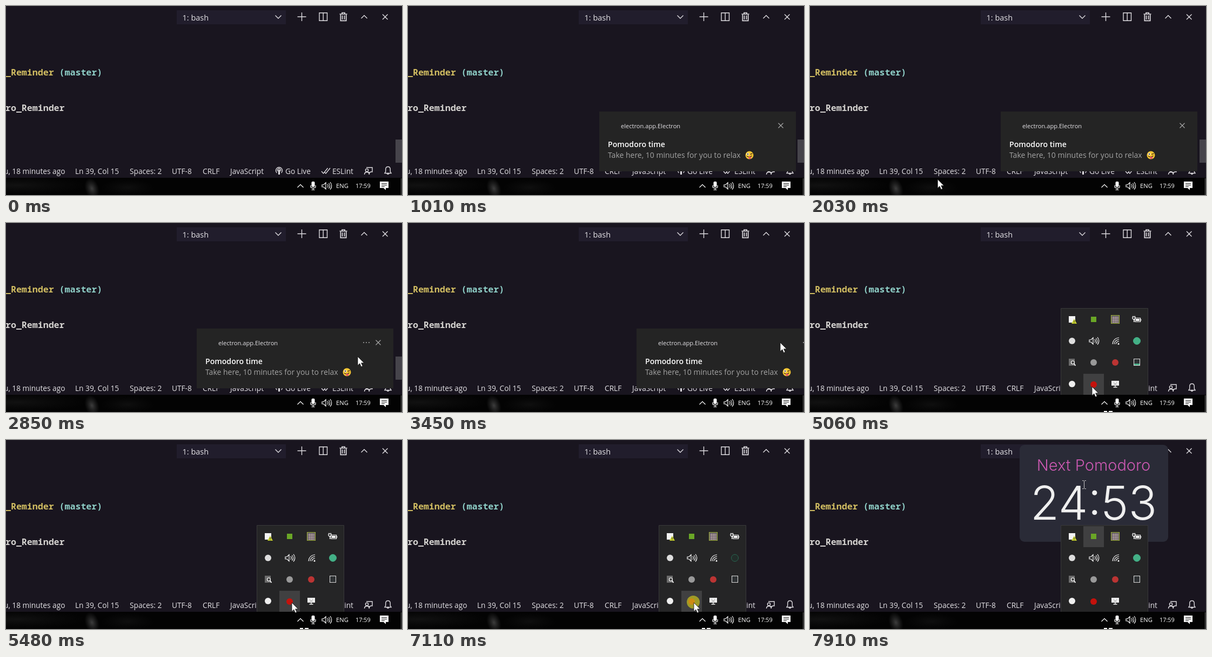
These frames come from a looping animation (733 by 351 pixels, 8000 ms). An HTML page:

```html
<!DOCTYPE html>
<html lang="en">
<head>
<meta charset="utf-8">
<title>Reminder desktop</title>
<style>
  html, body { margin: 0; width: 100%; height: 100%; overflow: hidden; background: #19151f; }
  svg { display: block; width: 733px; height: 351px; }
  text { font-family: "Open Sans", sans-serif; fill: #e4e2e6; white-space: pre; }
  .mono { font: 600 16.6px "Noto Sans Mono", monospace; }
  .status { font-size: 13.7px; font-weight: 500; }
  .tray { font-size: 11.2px; font-weight: 500; fill: #fff; }
  .inter { font-family: Inter, sans-serif; font-weight: 300; text-anchor: middle; }
  .line { fill: none; stroke: #dedce0; stroke-width: 1.4; }
  .white { fill: none; stroke: #fff; stroke-width: 1.2; }
</style>
</head>
<body>
<svg viewBox="0 0 733 351">
  <defs>
    <radialGradient id="smoke">
      <stop offset="0" stop-color="#777" stop-opacity=".5"/>
      <stop offset="1" stop-color="#555" stop-opacity="0"/>
    </radialGradient>
    <pattern id="grid" width="3" height="3" patternUnits="userSpaceOnUse">
      <path d="M0 0H2V2H0Z" fill="#d9b9c4"/>
    </pattern>
    <pattern id="dots" width="3" height="3" patternUnits="userSpaceOnUse">
      <path d="M0 0H2V2H0Z" fill="#3c4347"/>
    </pattern>
    <g id="speaker" class="white">
      <path d="M-8 -2h3l4 -4v12l-4 -4h-3zM2 -3q2.500 3 0 6M4.500 -5q4 5 0 10M7 -7q5.500 7 0 14"/>
    </g>
  </defs>

  <rect width="733" height="351" fill="#19151f"/>

  <!-- terminal -->
  <rect x="316" y="8" width="202" height="26" fill="#211d2c"/>
  <text x="326.500" y="26.500" font-size="14.5" font-weight="500">1: bash</text>
  <g class="line">
    <path d="M498.500 17.500l5.500 5.500 5.500 -5.500M539.500 20h16M547.500 12v16M580 12.700h14.500v14.600h-14.500zM587.200 12.700v14.600M657.500 23l5.500 -5.500 5.500 5.500M697 15.500l9.500 9.500m0 -9.500l-9.500 9.500"/>
    <path d="M617.500 15h14M622 15v-2.500h5v2.500M619.300 16v11.300h10.400v-11.300M622.500 17.500v7.500M626.500 17.500v7.500" stroke-width="1.7"/>
  </g>
  <text class="mono" x="-1" y="129" style="fill:#d2be62">_Reminder <tspan fill="#8fd0c8">(master)</tspan></text>
  <text class="mono" x="-1" y="194.500" style="fill:#d5d3d0">ro_Reminder</text>
  <rect id="scrollbar" x="721" y="248" width="12" height="43" fill="#46444b"/>

  <!-- status bar -->
  <g class="status">
    <text x="109.500" y="312" text-anchor="end">u, 18 minutes ago</text>
    <text x="128" y="312">Ln 39, Col 15</text>
    <text x="229" y="312">Spaces: 2</text>
    <text x="307" y="312">UTF-8</text>
    <text x="364" y="312">CRLF</text>
    <text x="415" y="312">JavaScript</text>
    <text x="517" y="312">Go Live</text>
    <text x="604" y="312">ESLint</text>
  </g>
  <g class="line">
    <path d="M501.500 310a6 6 0 1 1 8 0M503.300 307a3 3 0 1 1 4.400 0"/>
    <path d="M505.500 304v9" stroke-width="3"/>
    <path d="M584 307l3.500 4 8 -10M590 309l2 2 8 -10"/>
    <path d="M667 300h11v8h-3l-3 3v-3M663.500 313q0 -4.500 4.500 -4.500t4.500 4.500"/>
    <circle cx="668" cy="305" r="2.600"/>
    <path d="M701 310.500h12l-1.700 -3v-4q0 -5 -4.300 -5t-4.300 5v4zM705 311q2 3 4 0"/>
  </g>

  <!-- taskbar -->
  <rect y="319" width="733" height="32" fill="#030303"/>
  <svg y="319" width="733" height="32">
    <ellipse cx="20" cy="14" rx="130" ry="18" fill="url(#smoke)" opacity=".25"/>
    <ellipse cx="159" cy="20" rx="13" ry="20" fill="url(#smoke)" transform="rotate(-18 159 20)"/>
    <ellipse cx="225" cy="18" rx="50" ry="16" fill="url(#smoke)" opacity=".2"/>
  </svg>
  <path d="M731.500 320v31" stroke="#666"/>
  <rect id="caret" x="533" y="319" width="24" height="32" fill="#272727"/>
  <path class="white" d="M539.500 337l5.500 -5.500 5.500 5.500"/>
  <rect x="565.500" y="326" width="6" height="10" rx="2" fill="#fff"/>
  <path class="white" d="M564 333v3q0 2 4.500 2t4.500 -2v-3M568.500 338v3.500M565.500 341.500h6"/>
  <use href="#speaker" x="593" y="334"/>
  <text class="tray" x="611" y="338">ENG</text>
  <text class="tray" x="647" y="338" style="font-size:10.9px">17:59</text>
  <path d="M692 326h16v12h-5v4l-4 -4h-7z" fill="#fff"/>
  <path d="M695 329.500h10M695 332.500h10M695 335.500h6" stroke="#111"/>

  <!-- notification -->
  <g id="toast">
    <rect x="353" y="196" width="364" height="111" fill="#242424"/>
    <text x="393" y="227" font-size="11.1">electron.app.Electron</text>
    <text x="369" y="262" font-size="14.1" font-weight="600" style="fill:#fff">Pomodoro time</text>
    <text x="369" y="282" font-size="14" style="fill:#a3a3a3">Take here, 10 minutes for you to relax</text>
    <path d="M684.500 217.500l9 9m0 -9l-9 9" stroke="#a8a8a8" stroke-width="1.2"/>
    <path id="more" d="M661 222h2m3 0h2m3 0h2" stroke="#aaa" stroke-width="1.6"/>
    <circle cx="631" cy="277" r="7.500" fill="#f5c431"/>
    <circle cx="628" cy="275" r="2.300" fill="#fff"/>
    <circle cx="628" cy="275" r="1.200" fill="#33261c"/>
    <path d="M632.500 275.500l4 -1.500M626 278.500q5 4 9.500 -.5" fill="none" stroke="#4d351b" stroke-width="1.400"/>
    <path d="M629.500 280h4.500v2.500q-2.200 3 -4.500 0z" fill="#e4526a"/>
  </g>

  <!-- countdown -->
  <g id="timer">
    <rect x="388" y="9" width="275" height="180" rx="9" fill="#2a2b37"/>
    <text class="inter" x="525" y="57" font-size="29" style="fill:#cc59b2">Next Pomodoro</text>
    <text class="inter" x="525" y="148" font-size="87" style="fill:#efefef">24:53</text>
  </g>

  <!-- hidden icons -->
  <g id="popup">
    <path d="M464.500 319v-160.500h161v160.500" fill="#252526" stroke="#39393a"/>
    <rect id="cell" width="38" height="39" fill="#404041"/>
    <rect x="479" y="173" width="12" height="12" fill="#f4f4f4"/>
    <path d="M489 178l5 9h-10z" fill="#c5cf2c"/><path d="M489 181v3m0 1v1" stroke="#333"/>
    <rect x="520" y="174" width="10" height="10" fill="#6aa626"/>
    <rect x="557.500" y="171.500" width="15" height="15" fill="#555" stroke="#a6b43c"/>
    <rect x="559" y="173" width="12" height="12" fill="url(#grid)"/>
    <path class="white" d="M601.500 176.500h10v7h-10zM612.500 178.500v3M597 174.500h5v3q-2.500 3 -5 0zM598 172.500v2m3 -2v2M599.500 178v6"/>
    <path d="M603 178h7v4h-7z" fill="#fff"/>
    <circle cx="485" cy="219" r="6" fill="#dedede"/>
    <use href="#speaker" x="525" y="219"/>
    <path class="white" d="M560 225q1 -11 12 -12M563 225q1 -8 9 -8.500M566 225q1 -5 6 -5"/>
    <circle cx="571" cy="224.500" r="1.500" fill="#fff"/>
    <circle id="dot" cx="605" cy="219" r="6.500"/>
    <rect x="479" y="252" width="11" height="13" fill="#6c6c6c"/>
    <path d="M488.500 261l3 4" stroke="#fff" stroke-width="1.600"/>
    <circle cx="486.500" cy="259" r="3" fill="#444" stroke="#fff" stroke-width="1.200"/>
    <circle cx="525" cy="259" r="6" fill="#999"/>
    <circle cx="565" cy="259" r="6" fill="#bb3433"/>
    <rect x="599.500" y="252.500" width="11" height="12" fill="url(#dots)" stroke="#ddd"/>
    <rect id="level" x="600" y="261" width="10" height="3" fill="#4bb08a"/>
    <circle cx="485" cy="299" r="6" fill="#f0f0f0"/>
    <circle cx="525" cy="300" r="6" fill="#c4120c"/>
    <rect x="558" y="293" width="14" height="9" fill="#eee"/>
    <path d="M565 302v3m-3.500 0h7" stroke="#eee" stroke-width="1.400"/>
    <path d="M562 296h1m4 0h1M562.500 299h5" stroke="#777"/>
    <path d="M544 350h6m3 0h7" stroke="#fff" stroke-width="2"/>
  </g>

  <circle id="click" cx="528" cy="301" r="12" fill="#d2cc18" opacity=".65"/>
  <path id="arrow" d="M0 0v16.500l3.800 -3.600 2.600 6 2.800 -1.200 -2.600 -5.800h5.200z" fill="#fff" stroke="#111" stroke-width=".8"/>
  <path id="beam" d="M504 75.500h2.500l1 1 1 -1h2.500M507.500 76.500v13M504 90.500h2.500l1 -1 1 1h2.500" fill="none" stroke="#ccc"/>
</svg>
<script>
  const LOOP = 8000;
  const ticks = [0, 600, 800, 1010, 1210, 1410, 1610, 1830, 2030, 2240, 2440, 2640, 2850,
    3050, 3250, 3450, 3650, 3860, 4060, 4260, 4460, 4660, 4860, 5060, 5280, 5480,
    7110, 7310, 7510, 7910];
  // pointer stops: time, x, y
  const path = [[1830, 190, 330], [2850, 651, 248], [3250, 689, 222], [3450, 689, 222],
    [4060, 549, 339], [4460, 549, 339], [5060, 522, 304], [5280, 522, 304], [5480, 529, 302]];
  const $ = id => document.getElementById(id);
  const show = (id, on) => $(id).style.display = on ? "" : "none";
  const move = (id, x, y) => $(id).setAttribute("transform", `translate(${x} ${y})`);

  function pointer(t) {
    const i = path.findIndex(p => p[0] > t);
    if (i < 1) return path[i < 0 ? path.length - 1 : 0].slice(1);
    const [a, x, y] = path[i - 1], [b, u, v] = path[i];
    const s = (t - a) / (b - a), k = s * s * (3 - 2 * s);
    return [x + (u - x) * k, y + (v - y) * k];
  }

  function draw(time) {
    const t = ticks.findLast(k => k <= time);
    const [x, y] = pointer(t);
    const last = t >= 7910, open = t >= 4460;

    const slide = t < 3300 ? 380 * Math.exp((540 - t) / 80) : 380 * ((t - 3300) / 350) ** 2;
    show("toast", t >= 600 && slide < 380);
    move("toast", Math.round(slide), 0);
    show("more", t > 1830 && x > 353 && y < 307);

    show("arrow", t >= 1830 && !last);
    move("arrow", x, y);
    show("beam", last);
    show("caret", t >= 4060 && t < 5060 && y > 319);

    show("popup", open);
    show("scrollbar", !open);
    const col = last ? 1 : Math.floor((x - 465) / 40), row = last ? 0 : Math.floor((y - 159) / 40);
    show("cell", row < 4);
    move("cell", 506 + (col - 1) * 40, 160 + row * 40);
    const idle = t >= 7110 && !last;
    $("dot").setAttribute("fill", idle ? "#222d2a" : "#43b086");
    $("dot").setAttribute("stroke", idle ? "#286650" : "#43b086");
    show("level", t < 5480);

    show("click", t === 7110);
    show("timer", t >= 7310);
  }

  function frame(now) {
    draw(now % LOOP);
    requestAnimationFrame(frame);
  }
  draw(0);
  requestAnimationFrame(frame);
</script>
</body>
</html>
```
